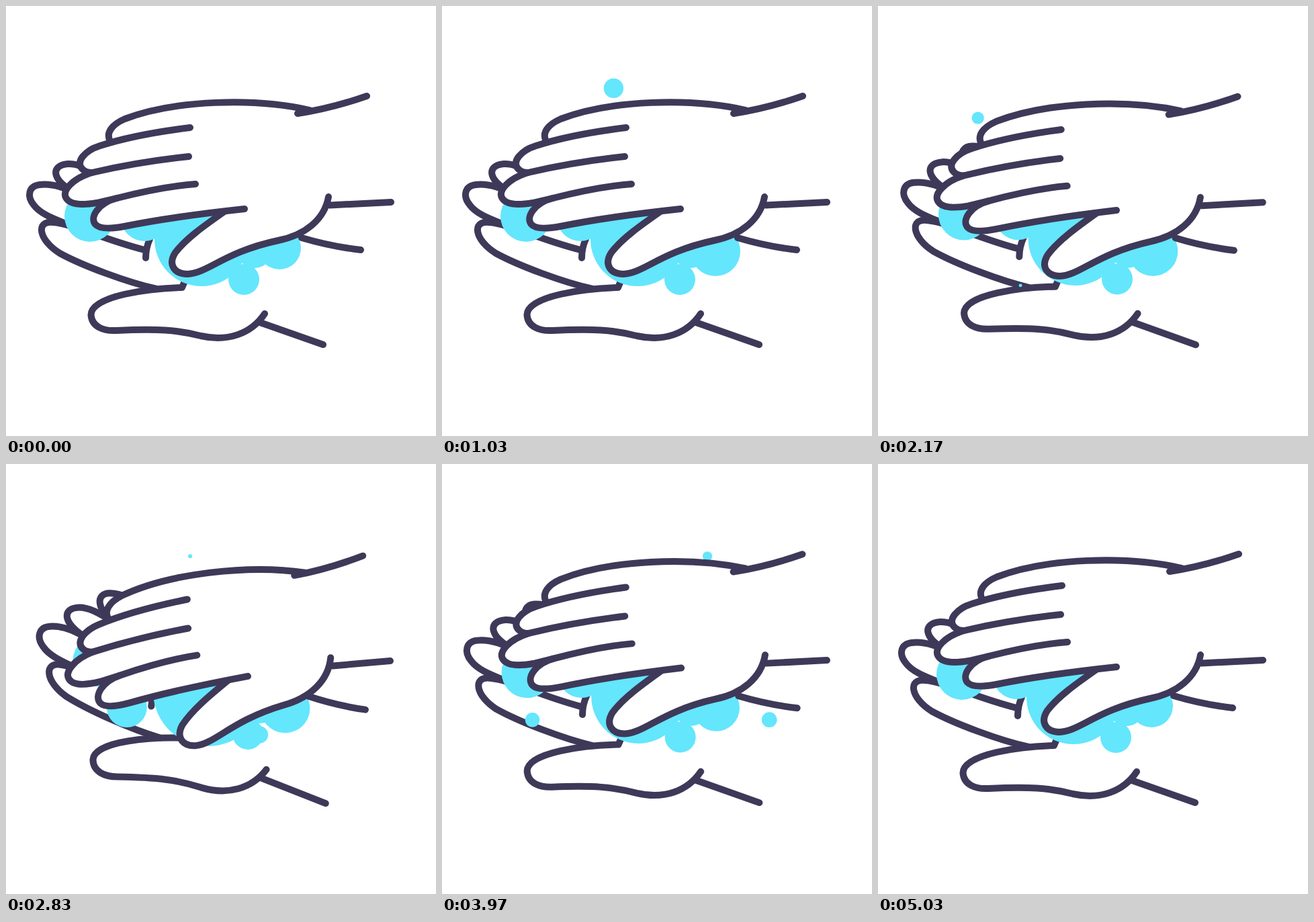
These frames come from a looping animation (640x640 px, 5060 ms). An HTML page:

```html
<!DOCTYPE html>
<html lang="en">
<head>
<meta charset="utf-8">
<title>Washing hands</title>
<style>
  html, body { margin: 0; width: 100%; height: 100%; overflow: hidden; background: #fff; }
  svg { display: block; width: 100vw; height: 100vh; }
  .line { fill: none; stroke: #3e3958; stroke-width: 10; stroke-linecap: round; stroke-linejoin: round; }
  .skin { fill: #fff; }
  .foam { fill: #64e6fc; }
</style>
</head>
<body>
<svg viewBox="0 0 640 640">
  <g id="lowerHand" class="line">
    <path d="M194 232C175 222 158 210 136 211C114 212 116 238 150 256"/>
    <path d="M148 255C128 246 110 234 92 235C66 237 66 260 108 281"/>
    <path d="M108 281C84 268 66 264 50 266C34 268 30 283 42 297C52 310 72 317 92 325"/>
    <path d="M224 421C180 411 115 387 80 368C48 348 44 319 70 322C100 324 140 346 206 363"/>
    <path d="M208 375Q208 360 214 347"/>
    <path d="M268 405L262 419C215 420 126 431 126.500 460C128 478 146 484 164 483C225 480 255 482 290 491C330 500 365 488 385 458"/>
  </g>
  <g id="foam" class="foam">
    <circle cx="125" cy="313" r="38"/>
    <circle cx="206" cy="315" r="35"/>
    <circle id="bigBubble" cx="291" cy="347"/>
    <circle cx="354" cy="407" r="23"/>
    <circle cx="370" cy="364" r="26"/>
    <circle id="sideBubble" cx="407"/>
  </g>
  <g id="flying" class="foam"></g>
  <g class="line">
    <path id="lowerArmTop"/>
    <path id="lowerArmBottom"/>
  </g>
  <path id="sleeve" class="skin"/>
  <g id="upperHand">
    <path class="skin" d="M452 155C370 136 250 140 177 168C156 177 150 189 154 200L140 208C118 215 102 232 114 243L128 248C98 257 84 275 89 285C95 297 117 296 135 293L165 286C138 293 124 314 133 325C140 333 160 331 176 328C235 316 290 309 325 306C295 327 268 346 252 367C240 386 252 399 270 399C300 398 325 366 405 349C445 341 474 318 480 284Z"/>
    <g class="line">
      <path d="M452 155C370 136 250 140 177 168C156 177 150 189 154 199"/>
      <path d="M274 181C225 187 180 195 140 208C118 215 102 232 114 243Q119 248 128 248"/>
      <path d="M272 224C225 229 175 237 128 248C98 257 84 275 89 285C95 297 117 296 135 293L165 286"/>
      <path d="M282 265C240 268 200 277 165 286C138 293 124 314 133 325C140 333 160 331 176 328C235 316 290 309 355 302"/>
      <path d="M325 306C295 327 268 346 252 367C240 386 252 399 270 399C300 398 325 366 405 349C445 341 474 318 480 284"/>
    </g>
  </g>
  <g class="line">
    <path id="upperArmTop"/>
    <path id="upperArmBottom"/>
  </g>
</svg>
<script>
const LOOP = 5060, STROKE = LOOP / 5;
const el = id => document.getElementById(id);

// phase, upper hand x, y, turn, lower hand x, y, turn, arm shift
const REST = [355, 302, 0, 126, 460, 0, 0];
const POSES = [
  [-0.03, ...REST],
  [0.05, ...REST],
  [0.144, 355, 304, -0.6, 127.5, 457.5, 0.5, 0.07],
  [0.22, 355.2, 313, -2.7, 133, 448, 2.5, 0.36],
  [0.417, 357, 336, -8.4, 144.5, 425.3, 6.4, 1],
  [0.453, 358, 337, -9, 144.6, 425.8, 6.6, 1],
  [0.6225, 362, 336, -10, 140, 420, 7.2, 0.83],
  [0.796, 360, 316, -4.5, 129, 440, 3.7, 0.27],
  [0.9, 357, 305, -1.2, 126.4, 455, 1, 0.05],
  [0.97, ...REST],
  [1.05, ...REST]
];

// start, end, from x, y, to x, y, size, easing power
const BUBBLES = [
  [300, 2150, 271, 210, 251, 97.5, 24.3, 3],
  [1150, 2600, 175, 230, 148, 165, 31, 3],
  [1700, 3050, 285, 215, 274, 137, 18.5, 3],
  [2750, 4250, 395, 180, 395, 137, 38, 3],
  [1150, 2300, 222, 350, 212, 416, 22, 3],
  [2450, 3350, 200, 320, 175, 372, 52, 3],
  [2500, 3300, 370, 375, 379, 410, 22, 3],
  [3150, 4500, 472, 284, 497, 443, 29, 1],
  [3150, 4550, 107, 297, 154, 440, 26, 1],
  [1100, 2400, 140, 288, 140, 288, 43, 1]
];

const circles = BUBBLES.map(() =>
  el("flying").appendChild(document.createElementNS("http://www.w3.org/2000/svg", "circle")));

const mix = (a, b, k) => a + (b - a) * k;
const clamp = v => Math.max(0, Math.min(1, v));
const ramp = (t, a, b) => { const k = clamp((t - a) / (b - a)); return k * k * (3 - 2 * k); };

const slope = (i, c) => (POSES[i + 1][c] - POSES[i][c]) / (POSES[i + 1][0] - POSES[i][0]);
function tangent(i, c) {
  if (i === 0 || i === POSES.length - 1) return 0;
  const a = slope(i - 1, c), b = slope(i, c);
  return a * b <= 0 ? 0 : 2 * a * b / (a + b);
}

// Monotone cubic interpolation between poses
function poseAt(phase) {
  let i = 0;
  while (POSES[i + 1][0] <= phase) i++;
  const [a, b] = [POSES[i], POSES[i + 1]];
  const h = b[0] - a[0], s = (phase - a[0]) / h, s2 = s * s, s3 = s2 * s;
  return REST.map((_, n) => {
    const c = n + 1;
    return a[c] * (2 * s3 - 3 * s2 + 1) + b[c] * (3 * s2 - 2 * s3)
      + h * (tangent(i, c) * (s3 - 2 * s2 + s) + tangent(i + 1, c) * (s3 - s2));
  });
}

function place(id, x, y, turn, x0, y0) {
  el(id).setAttribute("transform", `translate(${x} ${y}) rotate(${turn}) translate(${-x0} ${-y0})`);
}

function carry(px, py, x, y, turn, x0, y0) {
  const a = turn * Math.PI / 180, c = Math.cos(a), s = Math.sin(a);
  const dx = px - x0, dy = py - y0;
  return [x + dx * c - dy * s, y + dx * s + dy * c];
}

function arm(id, [x1, y1], [x2, y2], sag) {
  el(id).setAttribute("d", `M${x1} ${y1}Q${(x1 + x2) / 2} ${(y1 + y2) / 2 + sag} ${x2} ${y2}`);
}

function setCircle(node, x, y, r) {
  node.setAttribute("cx", x);
  node.setAttribute("cy", y);
  node.setAttribute("r", r);
}

function draw(t) {
  const [ux, uy, ua, lx, ly, la, u] = poseAt(t % STROKE / STROKE);
  const upper = [ux, uy, ua, 355, 302], lower = [lx, ly, la, 126, 460];
  place("upperHand", ...upper);
  place("lowerHand", ...lower);
  place("foam", ...lower);

  const topNear = [434 - 18 * u, 160 + 22 * u], topFar = [537 - 22 * u, 134 + 10 * u];
  const baseNear = carry(482, 296.5, ...upper), baseFar = [573 - 4 * u, 292 + 4 * u];
  arm("upperArmTop", topNear, topFar, 5);
  arm("upperArmBottom", baseNear, baseFar, 0);
  el("sleeve").setAttribute("d", `M${topNear}L${topFar}L${baseFar}L${baseNear}Z`);
  arm("lowerArmTop", carry(440, 345, ...lower), [528 + 26 * u, 363 + 10 * u], 4);
  arm("lowerArmBottom", carry(378, 471, ...lower), [472 + 14 * u, 504 + 4 * u], 0);

  const swell = ramp(t, 0, 900) * (1 - ramp(t, 3700, 4300));
  setCircle(el("sideBubble"), 407, 360 + 5 * swell, 32 + 5 * swell);
  el("bigBubble").setAttribute("r", 70 + 12 * ramp(t, 2300, 2750) * (1 - ramp(t, 2900, 3350)));

  BUBBLES.forEach(([t0, t1, x0, y0, x1, y1, size, power], i) => {
    const s = clamp((t - t0) / (t1 - t0)), k = 1 - (1 - s) ** power;
    setCircle(circles[i], mix(x0, x1, k), mix(y0, y1, k), size * (1 - s) * Math.min(1, s * 8));
  });
}

const begin = performance.now();
function tick() {
  draw((performance.now() - begin) % LOOP);
  requestAnimationFrame(tick);
}
tick();
</script>
</body>
</html>
```
